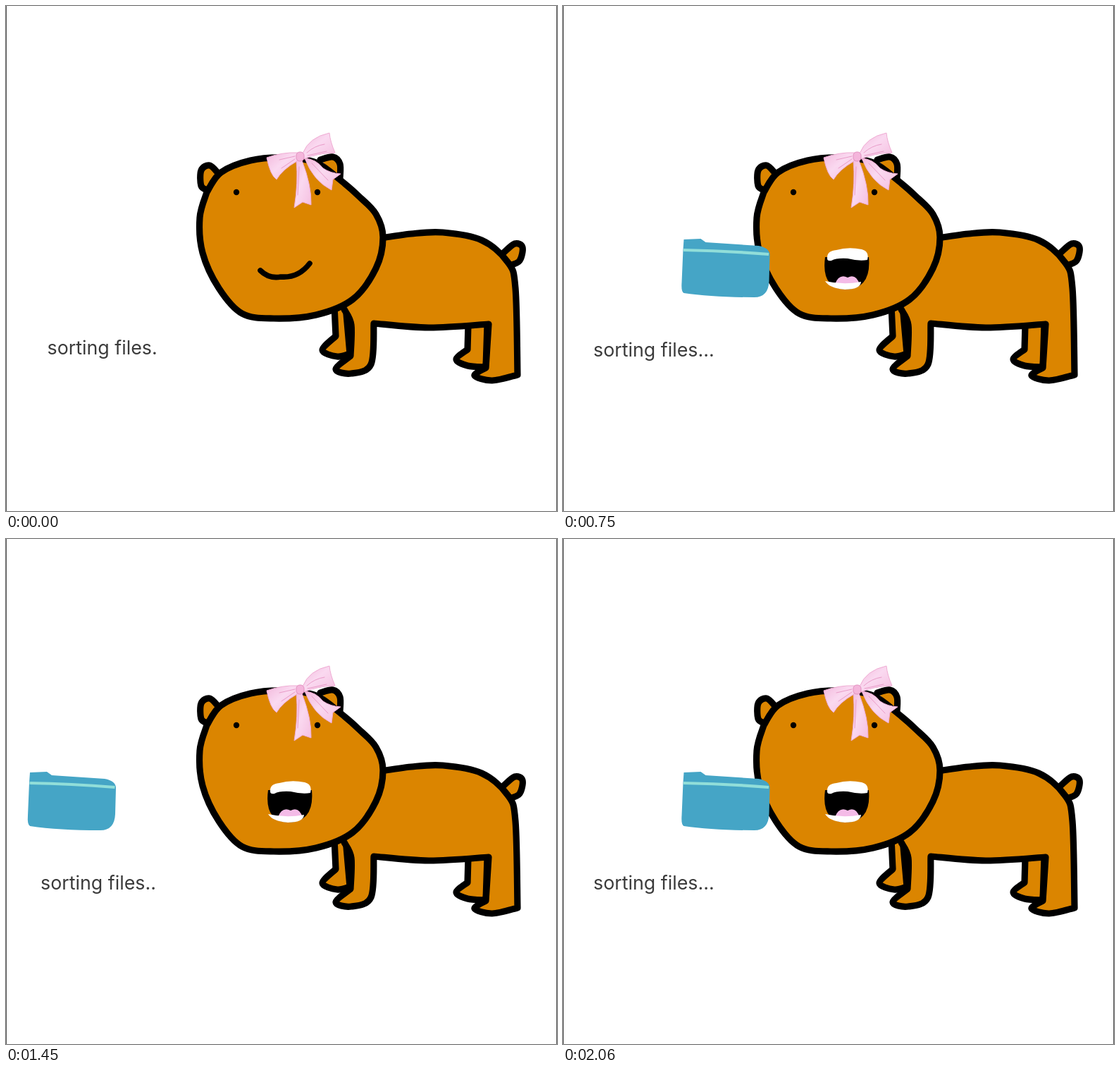
An HTML page that plays this animation: 782 px wide and 716 px high, repeating every 2.22 s.

```html
<!DOCTYPE html>
<html lang="en">
<head>
<meta charset="utf-8">
<title>Sorting files</title>
<style>
  html, body { margin: 0; width: 100%; height: 100%; overflow: hidden; background: #fff; }
  svg { display: block; width: 782px; height: 716px; }
  text { font: 26.8px Inter, "Open Sans", sans-serif; fill: #3b3b3b; white-space: pre; }
  .ink { stroke: #000; stroke-width: 9.2; stroke-linecap: round; stroke-linejoin: round; }
  .fur { fill: #db8500; }
</style>
</head>
<body>
<svg viewBox="0 0 782 716">
  <defs>
    <linearGradient id="silk" x1="0" y1="0" x2="1" y2="1">
      <stop offset="0" stop-color="#f3b9dc"/>
      <stop offset=".45" stop-color="#fad9f0"/>
      <stop offset="1" stop-color="#f5bfe0"/>
    </linearGradient>
  </defs>
  <path d="M.5 0V716M781.5 0V716" stroke="#555"/>
  <g id="animal"></g>

  <g fill="url(#silk)" stroke="#efacd3" stroke-linejoin="round">
    <path d="M412 219Q415 250 409 286L421 278L433 282Q434 255 420 219Z"/>
    <path d="M424 216Q440 217 450 230Q460 237 475 238L464 246L462 261Q436 248 424 216Z"/>
    <path d="M414 208Q392 207 370 215Q375 240 384 246Q392 232 413 220Z"/>
    <path d="M421 209Q430 186 459 180Q460 192 467 208Q440 209 423 217Z"/>
    <path d="M410 213L388 218M410 217L391 230M427 208Q438 198 452 196M428 212L455 206M416 228L414 268M434 223L457 247"
      fill="none" stroke="#e99bc8" stroke-linecap="round"/>
    <rect x="412" y="207" width="11" height="13" rx="5" fill="#f4b5db" stroke="#e393c1"/>
  </g>

  <path id="smile" class="ink" d="M361 375Q373 387 390 384Q415 386 431 365" fill="none" style="stroke-width:7.6"/>
  <g id="mouth">
    <path d="M372 356Q366 401 402 402Q438 400 434 356Z"/>
    <path d="M386 394Q392 379 404 385Q416 379 421 395Q403 401 386 394Z" fill="#f4bbe7"/>
    <path d="M375 358Q374 347 388 346Q405 341 424 345Q435 348 432 360Q420 362 404 358Q388 357 381 361Q375 362 375 358Z" fill="#fff"/>
    <path d="M372 390Q398 396 423 391Q422 402 400 402Q378 400 372 390Z" fill="#fff"/>
  </g>

  <g id="folder">
    <path d="M34 331L58 330L65 335L140 340Q156 343 156 353L155 390Q154 413 134 413Q75 413 34 407Q30 405 31 392L33 345Z" fill="#45a5c6"/>
    <path d="M33.5 346Q92 347 154.5 352" fill="none" stroke="#91ded9" stroke-width="4.2"/>
  </g>
  <text id="label"></text>
</svg>
<script>
const byId = id => document.getElementById(id);

// Smooth line through the points; "|" follows a sharp corner.
function outline(text) {
  let corner = '';
  return text.split(' | ').map((piece, n) => {
    const pts = `${corner} ${piece}`.trim().split(' ').map(p => p.split(',').map(Number));
    corner = pts.at(-1).join();
    const at = i => pts[Math.max(0, Math.min(pts.length - 1, i))];
    const bends = pts.slice(1).map((end, i) => {
      const out = at(i).map((v, k) => v + (end[k] - at(i - 1)[k]) / 6);
      const into = end.map((v, k) => v - (at(i + 2)[k] - at(i)[k]) / 6);
      return `C${out} ${into} ${end}`;
    });
    return (n ? '' : 'M' + pts[0]) + bends.join('');
  }).join('');
}

const animal = {
  farFrontLeg: '466,425 468,468 | 449,488 470,497 488,493 | 482,425',
  farBackLeg: '656,452 655,487 | 639,501 655,510 681,512 | 683,452',
  tail: '706,350 722,337 733,342 729,361 715,368',
  body: '520,331 575,323 620,321 675,332 712,363 723,400 726,523 | 690,531 665,524 681,513 | 685,451 | '
    + '600,456 522,450 | 518,508 490,521 468,515 489,496 | 490,452 480,430',
  leftEar: '286,261 277,255 277,233 289,226 302,238',
  rightEar: '474,244 474,224 464,214 446,218',
  head: '285,264 305,236 347,219 395,215 440,222 476,248 500,269 525,295 535,328 525,372 '
    + '492,416 440,438 380,443 335,436 302,400 279,350 275,300 285,264'
};
byId('animal').innerHTML =
  Object.values(animal).map(part => `<path class="ink fur" d="${outline(part)}"/>`).join('') +
  [327, 442].map(x => `<circle cx="${x}" cy="264" r="4.2"/>`).join('');

const poses = [
  { x: 58.5, y: 493.5 },
  { x: 49, y: 497, folder: 0 },
  { x: 43, y: 497, folder: 137.5 }
];
const stays = [370, 380, 330, 370, 380, 390];
const loop = stays.reduce((a, b) => a + b);

function show(index) {
  const { x, y, folder } = poses[index];
  const eating = folder !== undefined;
  const toggle = (id, on) => byId(id).setAttribute('visibility', on ? 'visible' : 'hidden');
  toggle('smile', !eating);
  toggle('mouth', eating);
  toggle('folder', eating);
  byId('folder').setAttribute('transform', `translate(${folder ?? 0} 0)`);
  const label = byId('label');
  label.textContent = 'sorting files' + '.'.repeat(index + 1);
  label.setAttribute('x', x);
  label.setAttribute('y', y);
}

let start;
function tick(now) {
  start ??= now;
  let t = (now - start) % loop, step = 0;
  while (t >= stays[step]) t -= stays[step++];
  show(step % poses.length);
  requestAnimationFrame(tick);
}
show(0);
requestAnimationFrame(tick);
</script>
</body>
</html>
```
